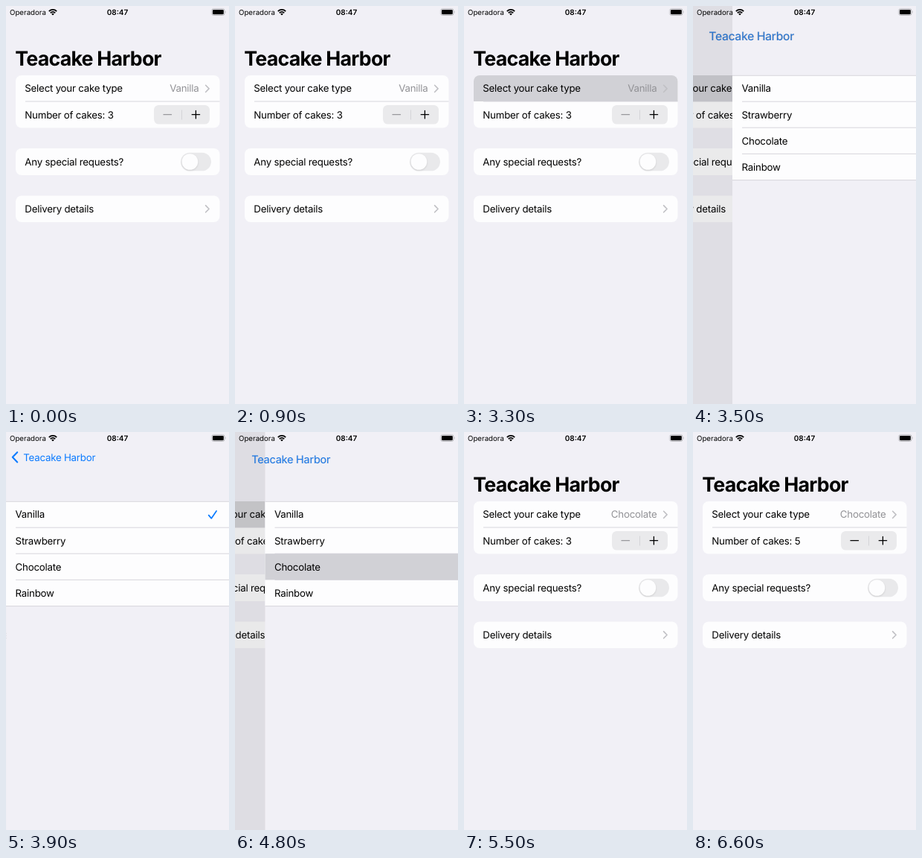
Write an HTML page that moves like this. It is 300x534 px and loops after 8 s.

```html
<!DOCTYPE html>
<html lang="en">
<head>
<meta charset="utf-8">
<title>Cake order</title>
<style>
  html, body { margin: 0; width: 100%; height: 100%; overflow: hidden; background: #f1f0f6; }
  svg { display: block; width: 300px; height: 534px; }
  text {
    font: 400 13.3px Inter, "Liberation Sans", sans-serif;
    letter-spacing: -.23px;
    white-space: pre;
    text-rendering: geometricPrecision;
  }
  .bg { fill: #f1f0f6; }
  .card { fill: #fdfdfe; }
  .pressed { fill: #d1d1d6; }
  .line { stroke: #d3d2d8; stroke-width: .9; }
  .value { fill: #929296; text-anchor: end; }
  .icon { fill: none; stroke-linecap: round; stroke-linejoin: round; }
  .more { stroke: #c0c0c4; stroke-width: 1.6; }
  .tint { stroke: #0a7aff; stroke-width: 2.1; }
  .large { font-size: 26.8px; font-weight: 700; letter-spacing: -.8px; }
  .small { fill: #0a7aff; }
  .carrier { font-size: 9.7px; letter-spacing: 0; }
  .clock { font-size: 10px; font-weight: 600; letter-spacing: 0; text-anchor: middle; }
  .knob { fill: #fdfdfe; filter: drop-shadow(0 1px 1.2px rgba(0, 0, 0, .12)); }
</style>
</head>
<body>
<svg viewBox="0 0 300 534">
  <clipPath id="topCard"><rect x="13" y="93" width="274.5" height="70.5" rx="8"/></clipPath>

  <rect class="bg" width="300" height="534"/>
  <g id="home">
    <rect class="card" x="13" y="93" width="274.5" height="70.5" rx="8"/>
    <g clip-path="url(#topCard)"><rect id="typePress" class="pressed" x="13" y="93" width="275" height="35"/></g>
    <path class="line" d="M26 128H287.5"/>
    <text x="25.3" y="115.4">Select your cake type</text>
    <text id="type" class="value" x="259.5" y="115.4">Vanilla</text>
    <path class="icon more" d="M268.6 106.3l4.5 4.6-4.5 4.6"/>

    <text id="count" x="25.3" y="150.6">Number of cakes: 3</text>
    <rect x="199" y="133" width="75" height="25.5" rx="6.4" fill="#eaeaec"/>
    <path id="plusPress" class="pressed" d="M236.5 133h31.1a6.4 6.4 0 0 1 6.4 6.4v12.7a6.4 6.4 0 0 1-6.4 6.4h-31.1z"/>
    <path d="M236.5 139.5v13" stroke="#d2d2d6" stroke-width=".9"/>
    <path id="minus" class="icon" d="M212 145.7h10.5" stroke-width="1.3"/>
    <path class="icon" d="M250.2 145.7h10.4M255.4 140.5v10.4" stroke="#000" stroke-width="1.3"/>

    <rect class="card" x="13" y="191" width="274.5" height="36" rx="8"/>
    <text x="25.3" y="213.8">Any special requests?</text>
    <rect x="235" y="196.7" width="41" height="24.6" rx="12.3" fill="#e9e9eb"/>
    <circle class="knob" cx="247.4" cy="209" r="10.8"/>

    <rect class="card" x="13" y="254.5" width="274.5" height="35.5" rx="8"/>
    <text x="25.3" y="277">Delivery details</text>
    <path class="icon more" d="M268.6 267.6l4.5 4.6-4.5 4.6"/>
  </g>
  <rect id="dim" width="300" height="534"/>

  <g id="list">
    <rect class="bg" width="300" height="534"/>
    <rect class="card" y="93" width="300" height="140.8"/>
    <rect id="rowPress" class="pressed" y="163.2" width="300" height="35.2"/>
    <path class="line" d="M0 93.3H300M13 128.2H300M13 163.2H300M13 198.4H300M0 233.6H300"/>
    <text x="12.5" y="115.4">Vanilla</text>
    <text x="12.5" y="150.6">Strawberry</text>
    <text x="12.5" y="185.8">Chocolate</text>
    <text x="12.5" y="221">Rainbow</text>
    <path class="icon tint" style="stroke-width:1.7" d="M272.6 111.6l3.6 4.3 6.8-10"/>
  </g>

  <path id="back" class="icon tint" d="M15.2 27.2l-6.4 6.6 6.4 6.6"/>
  <g id="small"><text class="small" y="4.84">Teacake Harbor</text></g>
  <g id="large"><text class="large" y="9.75">Teacake Harbor</text></g>

  <g id="status">
    <text class="carrier" x="5" y="11.7">Operadora</text>
    <g transform="translate(63 12.3)">
      <path d="M-5.2-5.2A7.4 7.4 0 0 1 5.2-5.2M-3.2-3A4.4 4.4 0 0 1 3.2-3" fill="none" stroke="#000" stroke-width="1.8"/>
      <path d="M0 .2L-1.8-1.6A2.5 2.5 0 0 1 1.8-1.6z"/>
    </g>
    <text class="clock" x="150" y="11.8">08:47</text>
    <rect x="276.8" y="3.7" width="17.2" height="8.8" rx="2.5" fill="none" stroke="#a9a9ad" stroke-width=".8"/>
    <rect x="278" y="4.9" width="14.8" height="6.4" rx="1.4"/>
    <path d="M295 6.6q1.3 1.5 0 3z" fill="#a9a9ad"/>
  </g>
</svg>
<script>
  const LOOP = 8000, STEP = 100;
  const PUSH = 3332, POP = 4766;
  const $ = id => document.getElementById(id);
  const mix = (a, b, k) => a + (b - a) * k;
  const clamp = v => Math.max(0, Math.min(1, v));
  const move = (id, x, y = 0, s = 1) =>
    $(id).setAttribute('transform', `translate(${x} ${y}) scale(${s})`);
  const fade = (id, v) => { $(id).style.opacity = clamp(v); };
  const textWidth = id => $(id).firstElementChild.getComputedTextLength();

  // Remaining distance of a critically damped spring, 1 to 0
  function spring(ms) {
    const u = Math.max(0, ms) * 0.0188;
    return u > 12 ? 0 : (1 + u) * Math.exp(-u);
  }

  function drawTitle(k) {
    const wide = textWidth('large'), narrow = textWidth('small');
    const width = mix(narrow, wide, k);
    const x = mix(23.2, 12.3, k), y = mix(33.8, 70, k);
    move('large', x, y, width / wide);
    move('small', x, y, width / narrow);
    fade('large', k);
    fade('small', 1 - k);
    fade('back', 1 - k / 0.08);
  }

  function draw(t) {
    const popping = t >= POP;
    const shown = popping ? spring(t - POP) : 1 - spring(t - PUSH);
    move('list', 300 * (1 - shown));
    move('home', -90 * shown);
    fade('dim', 0.09 * shown);
    drawTitle(popping ? (1 - shown) ** 1.2 : 1 - shown);

    fade('typePress', popping ? shown * 1.1 : +(t >= 3200));
    fade('rowPress', popping ? shown * 1.2 : 0);
    $('type').textContent = popping ? 'Chocolate' : 'Vanilla';

    const count = 3 + (t >= 6100) + (t >= 6500);
    $('count').textContent = 'Number of cakes: ' + count;
    $('minus').setAttribute('stroke', count > 3 ? '#000' : '#98989c');
    const held = t >= 6500 ? t < 6600 : t >= 6100 && t < 6200;
    fade('plusPress', held ? 1 : t >= 6200 && t < 6300 ? 0.5 : 0);
  }

  const start = performance.now();
  function tick() {
    const t = (performance.now() - start) % LOOP;
    draw(Math.floor(t / STEP) * STEP);
    requestAnimationFrame(tick);
  }
  tick();
</script>
</body>
</html>
```
